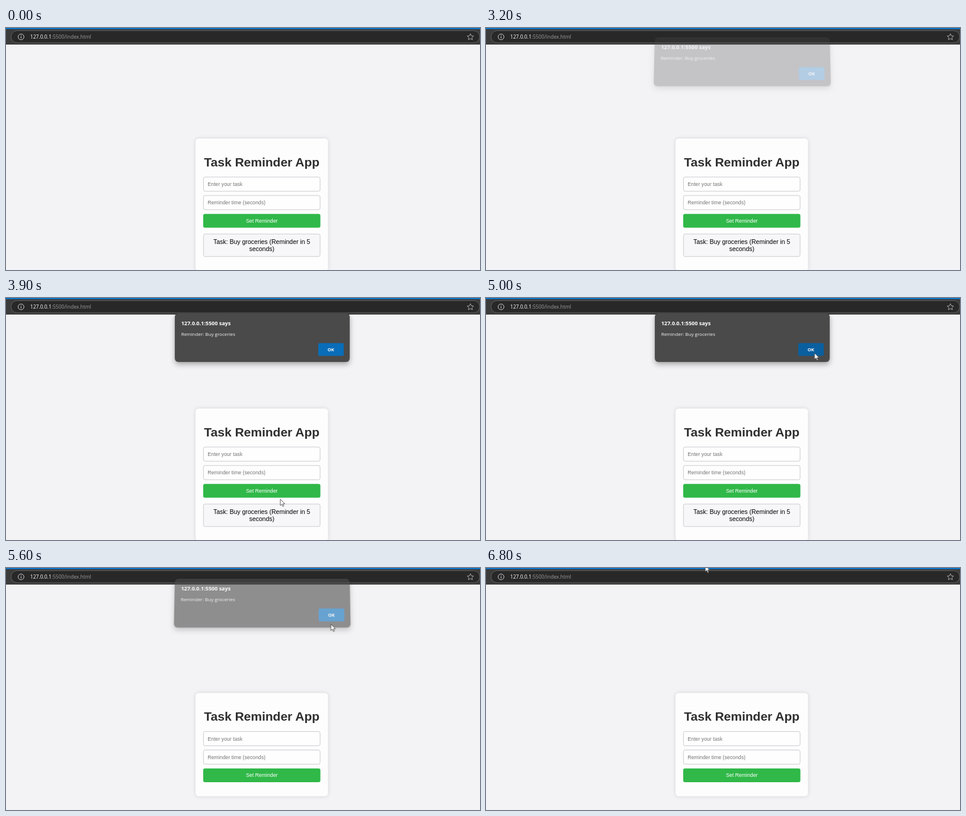
An HTML page for the animation above (7 s loop, 800 by 409 pixels).

```html
<!DOCTYPE html>
<html lang="en">
<head>
<meta charset="utf-8">
<title>Task Reminder App</title>
<style>
  html, body { margin: 0; width: 100%; height: 100%; overflow: hidden; background: #f3f2f4; }
  #stage { position: relative; width: 800px; height: 409px; overflow: hidden; }
  svg { position: absolute; left: 0; top: 0; overflow: visible; }
  #stage > svg { width: 800px; height: 409px; }

  /* browser bar and dialog */
  .ui { font-family: "Open Sans", "Noto Sans", sans-serif; font-size: 8.5px; }

  /* page */
  .page { font-family: "Liberation Sans", Arial, sans-serif; font-size: 8.76px; }
  .page h1, .title { font-size: 21px; font-weight: bold; fill: #2e2e2e; }
  .mid { text-anchor: middle; }
  .card { fill: #fdfdfe; filter: drop-shadow(0 0 3.3px rgba(0, 0, 0, .13)); }
  .field { fill: #fefefe; stroke: #cbcbcf; stroke-width: 1; }
  .hint { fill: #757575; }
  .item { font-size: 10.51px; }

  .dialog {
    position: absolute; left: 285px; top: 26px; width: 295px; height: 82px;
    background: #4a4a4a; border-radius: 6px;
    box-shadow: 0 4px 10px rgba(0, 0, 0, .32), 0 0 2px rgba(0, 0, 0, .3);
    transform-origin: 50% 0;
    animation: dialog 7s step-end infinite;
  }
  .dialog .ok { fill: #096db9; animation: ok 7s step-end infinite; }
  .full { animation: full 7s step-end infinite; }
  .short { animation: short 7s step-end infinite; }
  .cursor { animation: cursor 7s step-end infinite; }

  @keyframes full { 0% { opacity: 1 } 78.57%, 100% { opacity: 0 } }
  @keyframes short { 0% { opacity: 0 } 78.57%, 100% { opacity: 1 } }

  @keyframes dialog {
    0%     { opacity: 0;   transform: none }
    45.71% { opacity: .28; transform: translateY(-10.3px) perspective(640px) rotateX(6deg) }
    47.14% { opacity: .72; transform: translateY(-4.5px) perspective(640px) rotateX(2.7deg) }
    48.57% { opacity: .95; transform: translateY(-1.1px) perspective(640px) rotateX(.7deg) }
    50%    { opacity: 1;   transform: none }
    78.57% { opacity: .98; transform: translateY(-2.4px) perspective(640px) rotateX(1.4deg) }
    80%    { opacity: .6;  transform: translateY(-8px) perspective(640px) rotateX(4.6deg) }
    81.42%, 100% { opacity: 0; transform: none }
  }

  @keyframes ok {
    0%     { fill: #096db9 }
    64.28% { fill: #0b66ad }
    71.42% { fill: #0a5f9f }
    74.28%, 100% { fill: #096db9 }
  }

  @keyframes cursor {
    0%     { opacity: 0; transform: translate(463px, 340px) }
    55.71% { opacity: 1; transform: translate(463px, 340px); animation-timing-function: steps(2) }
    58.57% { transform: translate(474px, 309px); animation-timing-function: steps(3) }
    62.85% { transform: translate(538px, 139px); animation-timing-function: steps(2) }
    65.71% { transform: translate(556px, 91px) }
    68.57% { transform: translate(556px, 91px); animation-timing-function: steps(4) }
    74.28% { transform: translate(553px, 95px) }
    78.57% { transform: translate(553px, 95px); animation-timing-function: steps(2) }
    81.42% { transform: translate(543.8px, 94.8px) }
    85.71% { transform: translate(543.8px, 94.8px); animation-timing-function: steps(2) }
    88.57% { transform: translate(431.5px, 41px) }
    90%    { transform: translate(431.5px, 41px); animation-timing-function: steps(5) }
    97.14%, 100% { opacity: 1; transform: translate(370px, -4.5px) }
  }
</style>
</head>
<body>
<div id="stage">
  <svg viewBox="0 0 800 409">
    <defs>
      <g id="form">
        <text class="title mid" x="431.7" y="233.6">Task Reminder App</text>
        <rect class="field" x="333.3" y="251.9" width="196.8" height="24" rx="2.8"/>
        <text class="hint" x="340.2" y="267">Enter your task</text>
        <rect class="field" x="333.3" y="283.1" width="196.8" height="24" rx="2.8"/>
        <text class="hint" x="340.2" y="298.2">Reminder time (seconds)</text>
        <rect x="332.8" y="314.2" width="197.8" height="23.3" rx="3" fill="#30b848"/>
        <text class="mid" x="431.7" y="328.7" fill="#fff">Set Reminder</text>
      </g>
    </defs>

    <rect width="800" height="409" fill="#f3f2f4"/>

    <g class="page full">
      <rect class="card" x="320" y="186.8" width="223.5" height="223.7" rx="5.5"/>
      <use href="#form"/>
      <rect class="field" x="333.3" y="348.2" width="196.8" height="38" rx="2.8" style="fill:#f7f7fa"/>
      <g class="item mid">
        <text x="431.7" y="364.7">Task: Buy groceries (Reminder in 5</text>
        <text x="431.7" y="376.9">seconds)</text>
      </g>
    </g>
    <g class="page short">
      <rect class="card" x="320" y="211.2" width="223.5" height="174.6" rx="5.5"/>
      <use href="#form" y="24.5"/>
    </g>

    <g class="ui">
      <rect width="800" height="28" fill="#3b3b3b"/>
      <rect width="800" height="2" fill="#0b74c8"/>
      <rect x="8.5" y="4.5" width="791" height="20.5" rx="10.2" fill="#282828" stroke="#606060"/>
      <g fill="none" stroke="#e4e4e4">
        <circle cx="25.4" cy="15" r="4.9" stroke-width=".9"/>
        <path d="M25.4 14.3v3.2M25.4 12.1v1.1" stroke-width="1"/>
      </g>
      <text x="40.8" y="18.1" fill="#9c9c9c"><tspan fill="#fff">127.0.0.1</tspan>:5500/index.html</text>
      <path d="M783.8 9.6l1.6 3.5 3.8.4-2.8 2.6.8 3.8-3.4-1.9-3.4 1.9.8-3.8-2.8-2.6 3.8-.4z"
            fill="none" stroke="#b4b4b4" stroke-width=".9" stroke-linejoin="round"/>
    </g>
  </svg>

  <div class="dialog">
    <svg class="ui" width="295" height="82">
      <text x="10.7" y="19.7" fill="#fff" font-size="9" font-weight="700">127.0.0.1:5500 says</text>
      <text x="10.7" y="38.2" fill="#f4f4f4" font-size="8">Reminder: Buy groceries</text>
      <rect class="ok" x="242" y="50.3" width="43" height="21.4" rx="2.5"/>
      <text class="mid" x="263.2" y="63.9" fill="#fff" font-size="7.6" font-weight="700">OK</text>
    </svg>
  </div>

  <svg viewBox="0 0 800 409">
    <path class="cursor" d="M0 0V10.8L2.5 8.5 4.2 12.4 5.9 11.7 4.2 7.9H7.6Z"
          fill="#fff" stroke="#3a3a3a" stroke-width=".8" stroke-linejoin="round"/>
  </svg>
</div>
</body>
</html>
```
